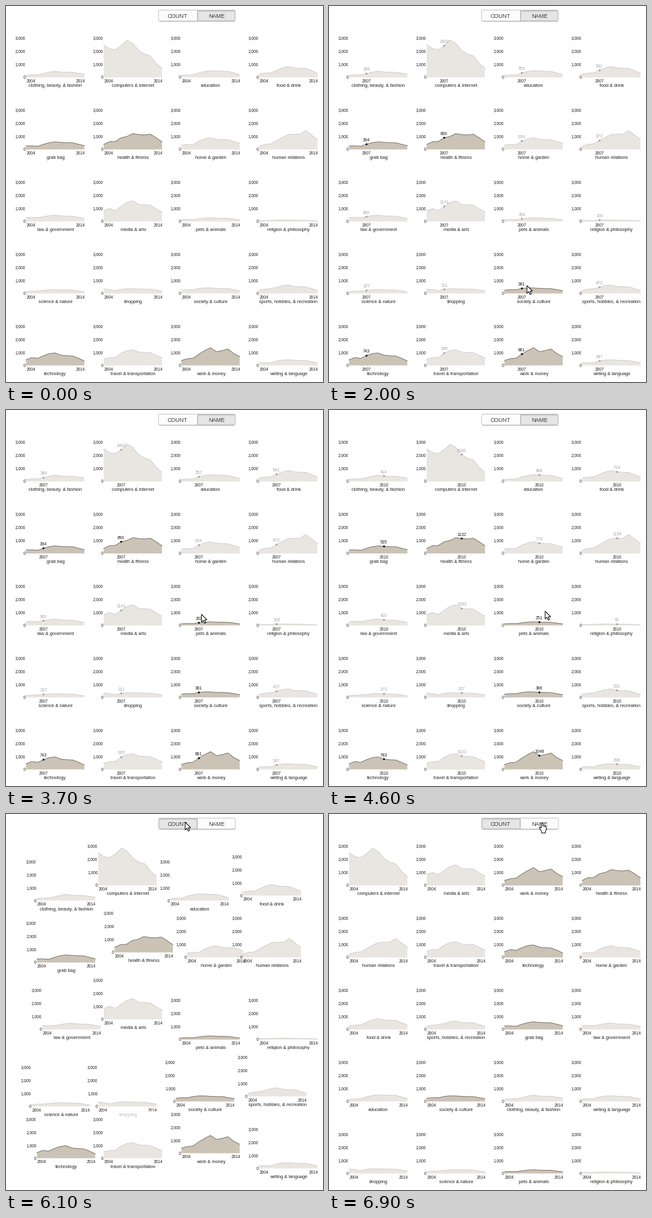
Animation, 506 px wide and 600 px high, one loop 7100 ms. Source, as a matplotlib script:

```python
import numpy as np
import matplotlib.pyplot as plt
from matplotlib.animation import FuncAnimation
from matplotlib.patches import Circle, FancyBboxPatch, Polygon, Rectangle
from matplotlib.transforms import Affine2D

W, H, DPI = 506, 600, 64
FRAMES, STEP = 71, 100
PX = 72 / DPI

CHART_W, UNIT = 93, 0.021
COLS, COL0, COL_GAP = 4, 32, 124
ROW0, ROW_GAP = 114, 114.9
FIRST_YEAR = 2004
XS = np.linspace(0, CHART_W, 11)

PALE = dict(fill="#e9e6e2", line="#d2d0cc", text="#a9a9a9", dot="#a0a0a0")
DARK = dict(fill="#cbc3b6", line="#7d776b", text="#222222", dot="#000000")

# Yearly counts, 2004 to 2014
YEARLY = {
    "computers & internet": [2473, 2190, 2115, 2402, 2836, 2580, 2046, 1770, 1645, 1070, 690],
    "health & fitness": [380, 590, 610, 890, 990, 1200, 1132, 1100, 1160, 890, 580],
    "human relations": [250, 390, 420, 673, 920, 1130, 1154, 1160, 1440, 1100, 760],
    "media & arts": [820, 980, 840, 1141, 1450, 1570, 1283, 1270, 1240, 960, 700],
    "technology": [430, 600, 540, 743, 900, 950, 783, 740, 720, 550, 340],
    "work & money": [380, 510, 550, 861, 1130, 1350, 1048, 1130, 1250, 900, 680],
}
# Counts for 2004, 2006, 2007, 2009, 2010 and 2014
SPARSE = {
    "clothing, beauty, & fashion": [160, 200, 286, 480, 410, 260],
    "education": [150, 190, 352, 510, 488, 220],
    "food & drink": [270, 340, 541, 830, 724, 340],
    "grab bag": [270, 240, 394, 580, 535, 280],
    "home & garden": [330, 370, 634, 890, 774, 460],
    "law & government": [290, 290, 360, 490, 420, 230],
    "pets & animals": [130, 140, 202, 280, 251, 120],
    "religion & philosophy": [60, 80, 100, 100, 92, 40],
    "science & nature": [130, 190, 227, 290, 272, 120],
    "shopping": [340, 210, 311, 360, 337, 190],
    "society & culture": [250, 280, 381, 420, 386, 210],
    "sports, hobbies, & recreation": [240, 360, 472, 650, 532, 230],
    "travel & transportation": [490, 610, 935, 1190, 1022, 580],
    "writing & language": [200, 200, 347, 430, 398, 200],
}

# Time at which each chart becomes selected
PICKED = {
    "grab bag": 0, "health & fitness": 0, "technology": 0, "work & money": 0,
    "society & culture": 1.9, "pets & animals": 3.2,
}
SORT_AT, SORT_TIME = 5.97, 0.5
PRESS_AT, HAND_AT = 6.0, 6.8

# Pointer path: time, x, y
PATH = np.array([
    (0.0, 362, 620), (0.6, 360, 599), (1.0, 350, 582), (1.6, 296, 500),
    (1.9, 316, 446), (2.0, 316, 446), (2.4, 338, 395), (2.5, 357, 368),
    (2.7, 310, 326), (3.1, 310, 326), (3.4, 358, 334), (3.7, 312, 326),
    (4.3, 345, 321), (4.6, 345, 321), (5.2, 281, 62), (5.4, 273, 25),
    (5.7, 272, 14), (5.9, 272, 14), (6.3, 300, 12), (6.7, 332, 14),
    (6.9, 340, 14),
])
ARROW = [(0, 0), (0, 12.4), (2.9, 9.8), (4.9, 14.3), (7, 13.4), (5, 9), (8.7, 8.8)]
HAND = [(0, 0), (-1.2, .8), (-1.2, 8.4), (-2.8, 6.9), (-4.3, 7.6), (-3.6, 9.8),
        (-1, 13), (-.6, 16.2), (5.4, 16.2), (5.9, 12.6), (7, 10.4), (6.9, 6.8),
        (5, 5.7), (3.2, 5.1), (1.3, 4.9), (1.2, .8)]

plt.rcParams["font.family"] = "Liberation Sans"
fig = plt.figure(figsize=(W / DPI, H / DPI), dpi=DPI, facecolor="white")
ax = fig.add_axes([0, 0, 1, 1])
ax.set(xlim=(0, W), ylim=(H, 0))
ax.axis("off")


def expand(v):
    """Fill in the years between the sparse counts."""
    a, c, d, f, g, k = v
    late = 0.95 * g
    return [a, 0.54 * (a + c), c, d, 0.53 * (d + f), f, g, 0.97 * g,
            late, (late + k) / 2, k]


def ease(u):
    u = np.clip(u, 0, 1)
    return 4 * u**3 if u < 0.5 else 1 - 4 * (1 - u)**3


def cell(i):
    return np.array([COL0 + COL_GAP * (i % COLS), ROW0 + ROW_GAP * (i // COLS)])


def write(x, y, s, size, ha="center", color="#222222", **kw):
    return ax.text(x, y, s, fontsize=size * PX, ha=ha, va="baseline", color=color, **kw)


class Chart:
    def __init__(self, name, values, order):
        self.name, self.values = name, np.array(values)
        self.ys = -UNIT * self.values
        self.start = self.end = cell(order)
        self.shift = Affine2D()
        tr = self.shift + ax.transData
        z = 10 * order

        self.veil = ax.add_patch(Rectangle(
            (0, -75), 98, 75, fc="white", alpha=0.72, lw=0, transform=tr, zorder=z))
        outline = [(0, 0), *zip(XS, self.ys), (CHART_W, 0)]
        self.area = ax.add_patch(Polygon(outline, lw=0, transform=tr, zorder=z + 1))
        self.line, = ax.plot(XS, self.ys, lw=PX, transform=tr, zorder=z + 2)

        kw = dict(transform=tr, zorder=z + 3)
        for n in range(0, 4000, 1000):
            write(-0.8, 2.4 - UNIT * n, f"{n:,}", 6.6, "right", **kw)
        write(47, 15.4, name, 7.35, **kw)
        self.ends = [write(0.6, 8, "2004", 6.6, "left", **kw),
                     write(94, 8, "2014", 6.6, "right", **kw)]
        self.year = write(0, 8, "", 6.6, **kw)
        self.count = write(0, 0, "", 6.9, **kw)
        self.dot = ax.add_patch(Circle((0, 0), 1.5, lw=0, transform=tr, zorder=z + 4))

    def update(self, t, year):
        x, y = self.start + (self.end - self.start) * ease((t - SORT_AT) / SORT_TIME)
        self.shift.clear().translate(x, y)

        picked = t >= PICKED.get(self.name, np.inf)
        style = DARK if picked else PALE
        self.veil.set_visible(not picked)
        self.area.set_facecolor(style["fill"])
        self.line.set_color(style["line"])

        hover = year is not None
        for label in self.ends:
            label.set_visible(not hover)
        for part in (self.year, self.count, self.dot):
            part.set_visible(hover)
        if hover:
            px, py = XS[year], self.ys[year]
            self.year.set(x=px, text=str(FIRST_YEAR + year))
            self.count.set(x=px, y=py - 4.5, text=f"{self.values[year]:.0f}",
                           color=style["text"])
            self.dot.set(center=(px, py), facecolor=style["dot"])


data = YEARLY | {name: expand(v) for name, v in SPARSE.items()}
charts = [Chart(name, data[name], i) for i, name in enumerate(sorted(data))]
for rank, chart in enumerate(sorted(charts, key=lambda c: -c.values.sum())):
    chart.end = cell(rank)

# Sort buttons
BX, BY, BW, BH = 243.5, 6.5, 122.5, 17.5


def rounded(**kw):
    return ax.add_patch(FancyBboxPatch(
        (BX, BY), BW, BH, boxstyle="round,pad=0,rounding_size=2.5", **kw))


base = rounded(fc="#fcfcfc", ec="none", zorder=300)
pressed = []
for inset, edge in enumerate(("#b9b9b9", "#d3d3d3", "#dedede")):
    box = ax.add_patch(Rectangle(
        (0, BY + inset), BW / 2 - 2 * inset, BH - 2 * inset,
        fc="#e6e6e6", ec=edge, lw=PX, zorder=301 + inset))
    box.set_clip_path(base)
    pressed.append(box)
rounded(fc="none", ec="#c6c6c6", lw=PX, zorder=305)
ax.plot([BX + 2, BX + BW - 2], [BY + BH] * 2, color="#b4b4b4", lw=PX, zorder=306)
write(274, 18.7, "COUNT", 9, color="#3a3a3a", zorder=307)
write(336, 18.7, "NAME", 9, color="#3a3a3a", zorder=307)

pointer = ax.add_patch(Polygon(ARROW, fc="white", ec="black", lw=PX,
                               joinstyle="round", zorder=400))


def hovered_year(x, y):
    left = COL0 + 2 * COL_GAP
    if left <= x <= left + CHART_W and 45 < y < 588:
        return int((x - left) / CHART_W * 10)
    return None


def draw(i):
    t = i * STEP / 1000
    pos = np.array([np.interp(t, PATH[:, 0], PATH[:, k]) for k in (1, 2)])
    year = hovered_year(*pos)
    for chart in charts:
        chart.update(t, year)
    side = BX if t >= PRESS_AT else BX + BW / 2
    for inset, box in enumerate(pressed):
        box.set_x(side + inset)
    pointer.set_xy(pos + np.array(HAND if t >= HAND_AT else ARROW))
    return []


anim = FuncAnimation(fig, draw, frames=FRAMES, interval=STEP, repeat=True,
                     repeat_delay=0, cache_frame_data=False)
plt.show()
```
